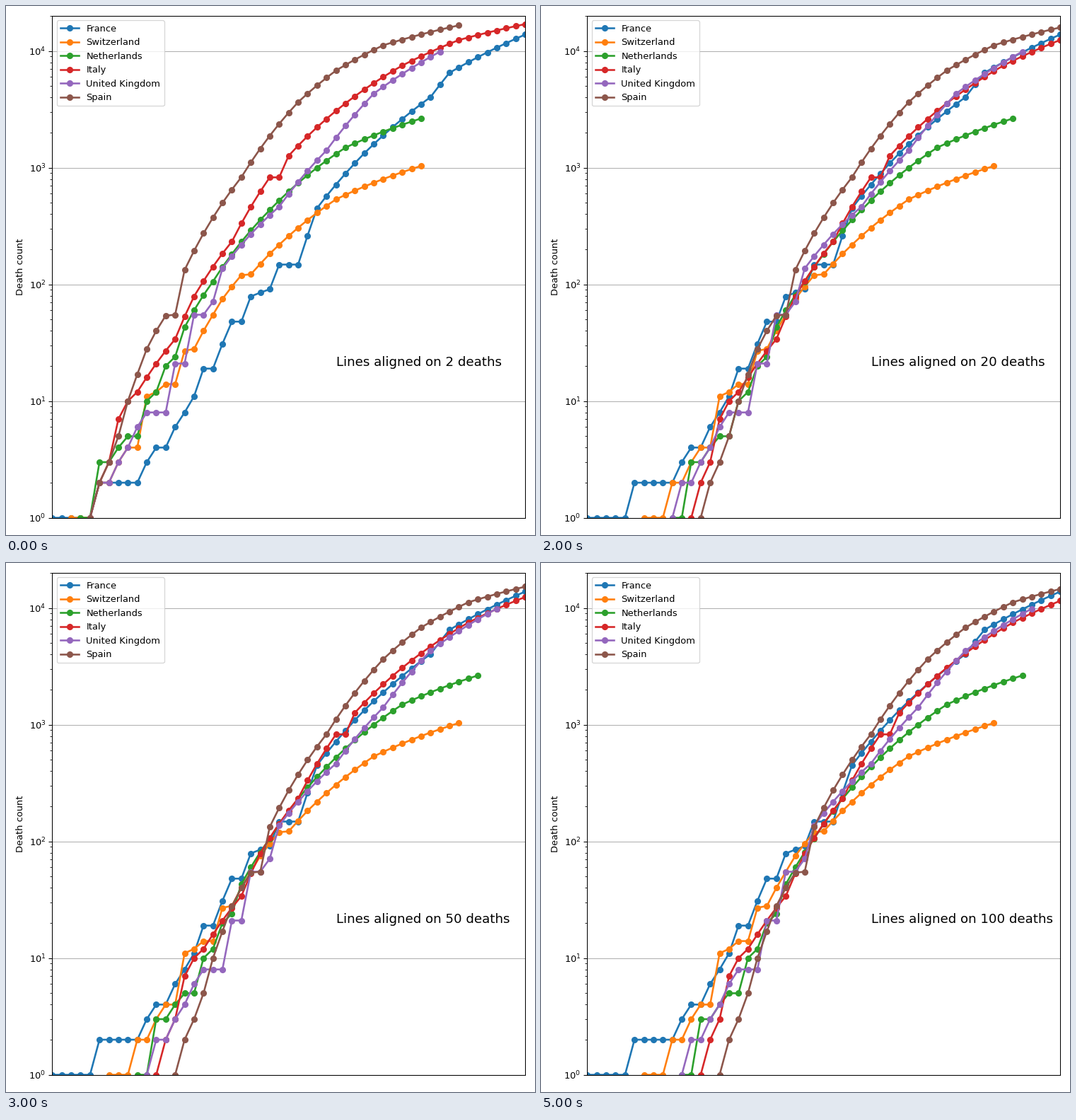
These frames come from a looping animation (748x748 px, 6000 ms). A matplotlib script:

```python
import matplotlib.pyplot as plt
import numpy as np
from matplotlib.animation import FuncAnimation

SIZE = 748
DPI = 93.5
LEVELS = [2, 10, 20, 50, 75, 100]

# Turning points of each curve, as day: cumulative count
TURNS = {
    "France": {
        0: 1, 4: 1, 5: 2, 9: 2, 11: 4, 12: 4, 15: 11, 16: 19, 17: 19, 19: 48,
        20: 48, 21: 79, 23: 91, 24: 148, 26: 148, 28: 450, 33: 1331, 40: 4032,
        42: 6507, 50: 13832},
    "Switzerland": {
        0: 1, 2: 1, 3: 2, 4: 2, 6: 4, 7: 4, 8: 11, 10: 14, 11: 14, 12: 27,
        13: 28, 16: 75, 18: 120, 19: 122, 28: 536, 37: 1036},
    "Netherlands": {
        0: 1, 1: 1, 2: 3, 3: 3, 5: 5, 6: 5, 7: 10, 8: 12, 9: 20, 10: 24,
        11: 43, 14: 106, 20: 434, 28: 1487, 36: 2643},
    "Italy": {
        0: 1, 2: 3, 3: 7, 4: 10, 5: 12, 9: 34, 11: 79, 15: 233, 17: 463,
        19: 827, 20: 827, 21: 1266, 33: 7503, 39: 12428, 47: 17669},
    "United Kingdom": {
        0: 1, 1: 2, 2: 2, 6: 8, 8: 8, 9: 21, 10: 21, 11: 55, 12: 55, 13: 71,
        14: 137, 20: 465, 25: 1408, 30: 4313, 37: 9875},
    "Spain": {
        0: 1, 3: 5, 4: 10, 6: 28, 8: 54, 9: 55, 10: 133, 16: 830, 22: 3647,
        26: 6803, 31: 11198, 39: 16606},
}


def slowing(day):
    """Time scale on which growth that fades with time is a straight line."""
    return -1 / (np.asarray(day) + 10)


def daily_counts(turns):
    """Whole counts for every day, exponential growth between turning points."""
    days = list(turns)
    every_day = np.arange(days[-1] + 1)
    logs = np.interp(slowing(every_day), slowing(days),
                     np.log10(list(turns.values())))
    return np.round(10 ** logs)


def first_day(counts, level):
    """First day on which the count reaches the level."""
    return int(np.argmax(counts >= level))


series = {name: daily_counts(turns) for name, turns in TURNS.items()}

fig, ax = plt.subplots(figsize=(SIZE / DPI, SIZE / DPI), dpi=DPI)
fig.subplots_adjust(left=65.3 / SIZE, right=734 / SIZE,
                    bottom=1 - 723.7 / SIZE, top=1 - 14 / SIZE)

ax.set_yscale("log")
ax.set_xlim(0, 50)
ax.set_ylim(1, 20000)
ax.set_xticks([])
ax.set_ylabel("Death count")
ax.grid(axis="y")

lines = [ax.plot(counts, marker="o", lw=2, label=name)[0]
         for name, counts in series.items()]
ax.legend(loc="upper left")
caption = ax.text(30, 20, "", fontsize=14.1)


def update(i):
    level = LEVELS[i]
    anchor = first_day(series["France"], level)
    for line, counts in zip(lines, series.values()):
        start = anchor - first_day(counts, level)
        line.set_xdata(start + np.arange(len(counts)))
    caption.set_text(f"Lines aligned on {level} deaths")
    return [*lines, caption]


anim = FuncAnimation(fig, update, frames=len(LEVELS), interval=1000,
                     init_func=lambda: update(0), repeat=True, repeat_delay=0)
plt.show()
```
